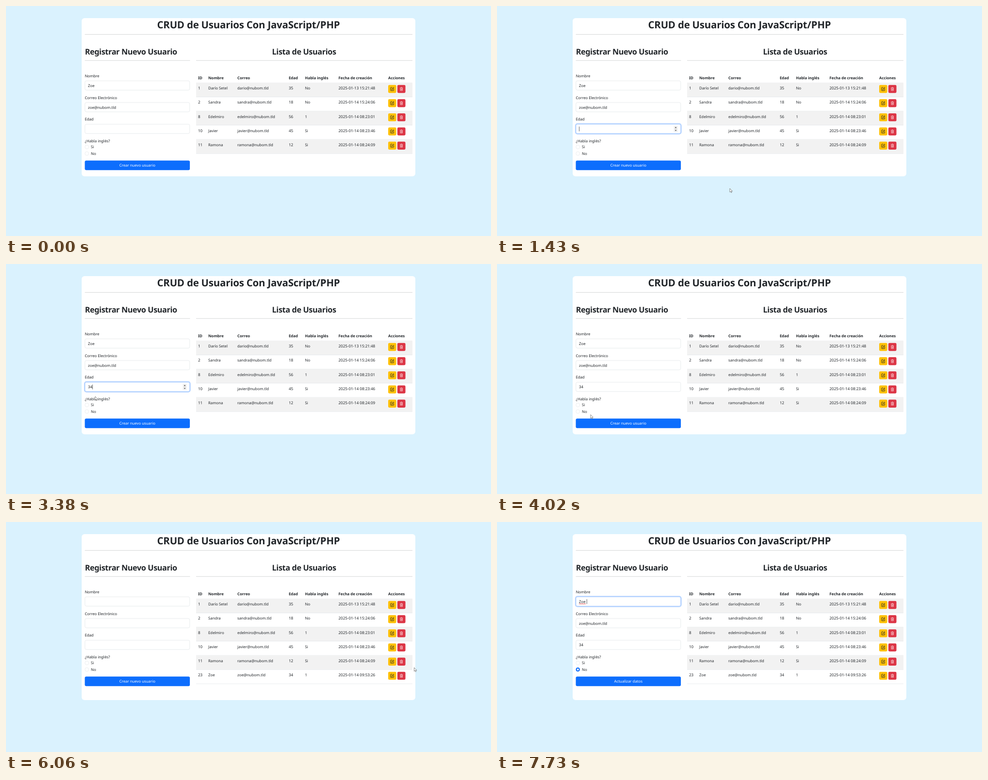
Recreate the animation shown at these times as an HTML page. Size 1000 by 474 pixels, loop 8 s.

```html
<!DOCTYPE html>
<html lang="es">
<head>
<meta charset="utf-8">
<style>
html, body { margin: 0; width: 100%; height: 100%; overflow: hidden; background: #daf2fe; }
svg { display: block; width: 1000px; height: 474px; }
text { font: 7.8px "Noto Sans", "Open Sans", sans-serif; fill: #212529; text-rendering: geometricPrecision; white-space: pre; }
.label { letter-spacing: -.06px; }
.num { font-size: 8px; }
.head { font-weight: 700; }
.h1 { font-size: 20.4px; font-weight: 700; letter-spacing: -.18px; }
.h2 { font-size: 16.2px; font-weight: 700; letter-spacing: -.36px; }
.mid { text-anchor: middle; }
.rule { fill: #cbcccd; }
.line { fill: #dee2e6; }
.ring { fill: none; stroke: #0d6efd; stroke-opacity: .27; stroke-width: 2.1; }
.icon { fill: none; stroke-linejoin: round; }
</style>
</head>
<body>
<svg id="stage" viewBox="0 0 1000 474"></svg>
<script>
const LOOP = 8000;
const FOCUS_AGE = 180, TYPE_3 = 2680, TYPE_4 = 2860, BLUR_AGE = 3400;
const PICK_YES = 4400, LEAVE_YES = 5450, SAVED = 5700;
const EDIT = 6620, FOCUS_NAME = 7450, TYPE_SPACE = 7730;

const stage = document.getElementById('stage');

function add(tag, attrs, parent = stage) {
  const el = document.createElementNS('http://www.w3.org/2000/svg', tag);
  for (const key in attrs) el.setAttribute(key, attrs[key]);
  return parent.appendChild(el);
}
const rect = (x, y, width, height, more, parent) => add('rect', { x, y, width, height, ...more }, parent);
function label(str, x, y, cls = '', parent) {
  const el = add('text', { x, y, class: cls }, parent);
  el.textContent = str;
  return el;
}
const show = (el, on) => el.setAttribute('visibility', on ? 'visible' : 'hidden');
const setText = (el, str) => { if (el.textContent !== str) el.textContent = str; };
const clamp = v => Math.max(0, Math.min(1, v));

// Card and headings
const card = rect(156, 25, 688, 326, { rx: 6, fill: '#fff' });
label('CRUD de Usuarios Con JavaScript/PHP', 500, 45.8, 'h1 mid');
label('Registrar Nuevo Usuario', 162.7, 100.4, 'h2');
label('Lista de Usuarios', 614.6, 100.4, 'h2 mid');
rect(162.5, 58, 675.5, .8, { class: 'rule' });
rect(162.5, 111.8, 217, .8, { class: 'rule' });
rect(392, 111.8, 446, .8, { class: 'rule' });

// Form
function field(title, y) {
  label(title, 162.5, y - 7, 'label');
  const ring = rect(161.9, y - .7, 217.8, 21.2, { rx: 4, class: 'ring' });
  const box = rect(162.8, y + .3, 216, 19.2, { rx: 3, fill: '#fff', stroke: '#dee2e6', 'stroke-width': .7 });
  const text = label('', 169, y + 13);
  const caret = rect(169, y + 5.2, .7, 9.8, { fill: '#212529' });
  return { ring, box, text, caret };
}
const nameField = field('Nombre', 153.9);
const mailField = field('Correo Electrónico', 198.6);
const ageField = field('Edad', 243.3);

const spinner = add('g', {});
rect(364.5, 247, 8, 12.5, { fill: '#efefef' }, spinner);
add('path', { d: 'M366.6 251.4l1.9 -2.3 1.9 2.3zM366.6 255.4l1.9 2.3 1.9 -2.3z', fill: '#505050' }, spinner);
const squiggle = add('path', {
  d: 'M169 169.4' + 'l1 -1.3 1 1.3'.repeat(7),
  fill: 'none', stroke: '#e8262a', 'stroke-width': .7
});

function radio(title, y) {
  const ring = add('circle', { cx: 166.7, cy: y, r: 5.1, class: 'ring' });
  const disc = add('circle', { cx: 166.7, cy: y, r: 3.9, 'stroke-width': .6 });
  const dot = add('circle', { cx: 166.7, cy: y, r: 2, fill: '#fff' });
  label(title, 175, y + 2.9);
  return (checked, glow) => {
    disc.setAttribute('fill', checked ? '#0d6efd' : '#fff');
    disc.setAttribute('stroke', checked ? '#0d6efd' : '#dee2e6');
    show(dot, checked);
    ring.setAttribute('opacity', glow);
  };
}
label('¿Habla inglés?', 162.5, 280.8);
const yes = radio('Si', 290.5);
const no = radio('No', 304);
const submit = rect(162.5, 318.4, 216.6, 19.8, { rx: 3 });
const submitText = label('', 270.8, 331.2, 'mid');
submitText.style.fill = '#fff';

// Table
const columns = [396, 417, 477, 583, 616.5, 685.5, 788];
['ID', 'Nombre', 'Correo', 'Edad', 'Habla inglés', 'Fecha de creación', 'Acciones']
  .forEach((title, i) => label(title, columns[i], 150.8, 'head'));
rect(392, 157.9, 446, .6, { class: 'line' });

const PENCIL = 'M8 2H3Q1.5 2 1.5 3.5V13Q1.5 14.5 3 14.5H12.5Q14 14.5 14 13V8M6 10.5L6.5 8L13 1.5L15 3.5L8.5 10Z';
const TRASH = 'M2.5 3.5H13.5M6 3V1.5H10V3M3.5 4L4 14.5H12L12.5 4M6 6.5V12M8 6.5V12M10 6.5V12';
function action(x, y, fill, icon, parent) {
  const box = rect(x, y, 16.7, 16.4, { rx: 2.4, fill }, parent);
  add('path', { ...icon, class: 'icon', transform: `translate(${x + 4.2} ${y + 4.1}) scale(.52)` }, parent);
  return box;
}
const editIcon = { d: PENCIL, stroke: '#212529', 'stroke-width': 1.7 };
const deleteIcon = { d: TRASH, stroke: '#fff', 'stroke-width': 1.2 };

const rows = [
  [1, 'Darío Setel', 'dario', 35, 'No', '13 15:21:48'],
  [2, 'Sandra', 'sandra', 18, 'No', '14 15:24:06'],
  [8, 'Edelmiro', 'edelmiro', 56, '1', '14 08:23:01'],
  [10, 'Javier', 'javier', 45, 'Si', '14 08:23:46'],
  [11, 'Ramona', 'ramona', 12, 'Si', '14 08:24:09'],
  [23, 'Zoe', 'zoe', 34, '1', '14 09:53:26']
].map(([id, name, user, age, english, date], i) => {
  const group = add('g', {});
  const y = 158.3 + 29.18 * i;
  if (i % 2 === 0) rect(392, y, 446, 29.18, { fill: '#f2f2f2' }, group);
  rect(392, y + 28.8, 446, .6, { class: 'line' }, group);
  [id, name, user + '@nubom.tld', age, english, '2025-01-' + date].forEach((value, c) =>
    label(value, columns[c], y + 14, [0, 3, 5].includes(c) ? 'num' : '', group));
  const edit = action(788, y + 4.5, '#ffc107', editIcon, group);
  action(806.9, y + 4.5, '#dc3545', deleteIcon, group);
  return { group, edit };
});
const newRow = rows[5];

// Pointer: time, x, y
const path = [
  [630, 942, 58], [760, 938.5, 65], [860, 938.5, 65], [1430, 480, 376], [1530, 440, 376],
  [1830, 172, 269], [3000, 172, 269], [3400, 184, 273], [4020, 193, 310.5], [4120, 193, 310.5],
  [4340, 167, 290], [4480, 167, 290], [4730, 179.5, 295], [5140, 179.5, 295],
  [5400, 232, 327], [5560, 232, 327], [5990, 841.5, 300], [6170, 841.5, 300],
  [6480, 797, 316], [6800, 797, 316], [7420, 196, 163], [7500, 196, 163]
];
const pointer = add('path', {
  d: 'M0 0V7.6L1.8 6L3 8.7L4.2 8.2L3 5.6H5.4Z',
  fill: '#fff', stroke: '#444', 'stroke-width': .6, 'stroke-linejoin': 'round'
});
function pointerAt(t) {
  const next = path.findIndex(p => p[0] > t);
  if (next < 1) return null;
  const [t0, x0, y0] = path[next - 1], [t1, x1, y1] = path[next];
  const u = (t - t0) / (t1 - t0), e = u * u * (3 - 2 * u);
  return [x0 + (x1 - x0) * e, y0 + (y1 - y0) * e];
}

// Focus ring strength with a 150 ms transition
const glow = (t, from, to) => clamp((t - from) / 150) * clamp(1 - (t - to) / 150);

function paintField(f, value, strength, caretOn) {
  setText(f.text, value);
  f.ring.setAttribute('opacity', strength);
  f.box.setAttribute('stroke', strength > .5 ? '#86b7fe' : '#dee2e6');
  show(f.caret, caretOn);
  if (caretOn) f.caret.setAttribute('x', 169.2 + (value ? f.text.getComputedTextLength() : 0));
}

function draw(t) {
  const filled = t < SAVED || t >= EDIT;
  const editing = t >= EDIT;
  const saved = t >= SAVED;
  const age = !filled || t < TYPE_3 ? '' : t < TYPE_4 ? '3' : '34';
  const ageFocused = t >= FOCUS_AGE && t < BLUR_AGE;
  const blinkStart = t >= TYPE_4 ? TYPE_4 : t >= TYPE_3 ? TYPE_3 : FOCUS_AGE;
  const blink = Math.floor((t - blinkStart) / 530) % 2 === 0;

  paintField(nameField, !filled ? '' : t >= TYPE_SPACE ? 'Zoe ' : 'Zoe', glow(t, FOCUS_NAME, LOOP + 150), t >= FOCUS_NAME);
  paintField(mailField, filled ? 'zoe@nubom.tld' : '', 0, false);
  paintField(ageField, age, glow(t, FOCUS_AGE, BLUR_AGE), ageFocused && blink);
  show(spinner, ageFocused);
  show(squiggle, t >= TYPE_SPACE);

  yes(t >= PICK_YES && t < SAVED, glow(t, PICK_YES, LEAVE_YES));
  no(editing, 0);

  card.setAttribute('height', saved ? 342 : 326);
  show(newRow.group, saved);
  setText(submitText, editing ? 'Actualizar datos' : 'Crear nuevo usuario');

  const pos = pointerAt(t);
  show(pointer, pos);
  if (pos) pointer.setAttribute('transform', `translate(${pos})`);
  const over = (x, y, w, h) => pos && pos[0] > x && pos[0] < x + w && pos[1] > y && pos[1] < y + h;
  submit.setAttribute('fill', over(162.5, 318.4, 216.6, 19.8) ? '#0b5ed7' : '#0d6efd');
  newRow.edit.setAttribute('fill', over(788, 308.7, 16.7, 16.4) ? '#ffca2c' : '#ffc107');
}

function tick() {
  draw(performance.now() % LOOP);
  requestAnimationFrame(tick);
}
tick();
</script>
</body>
</html>
```
